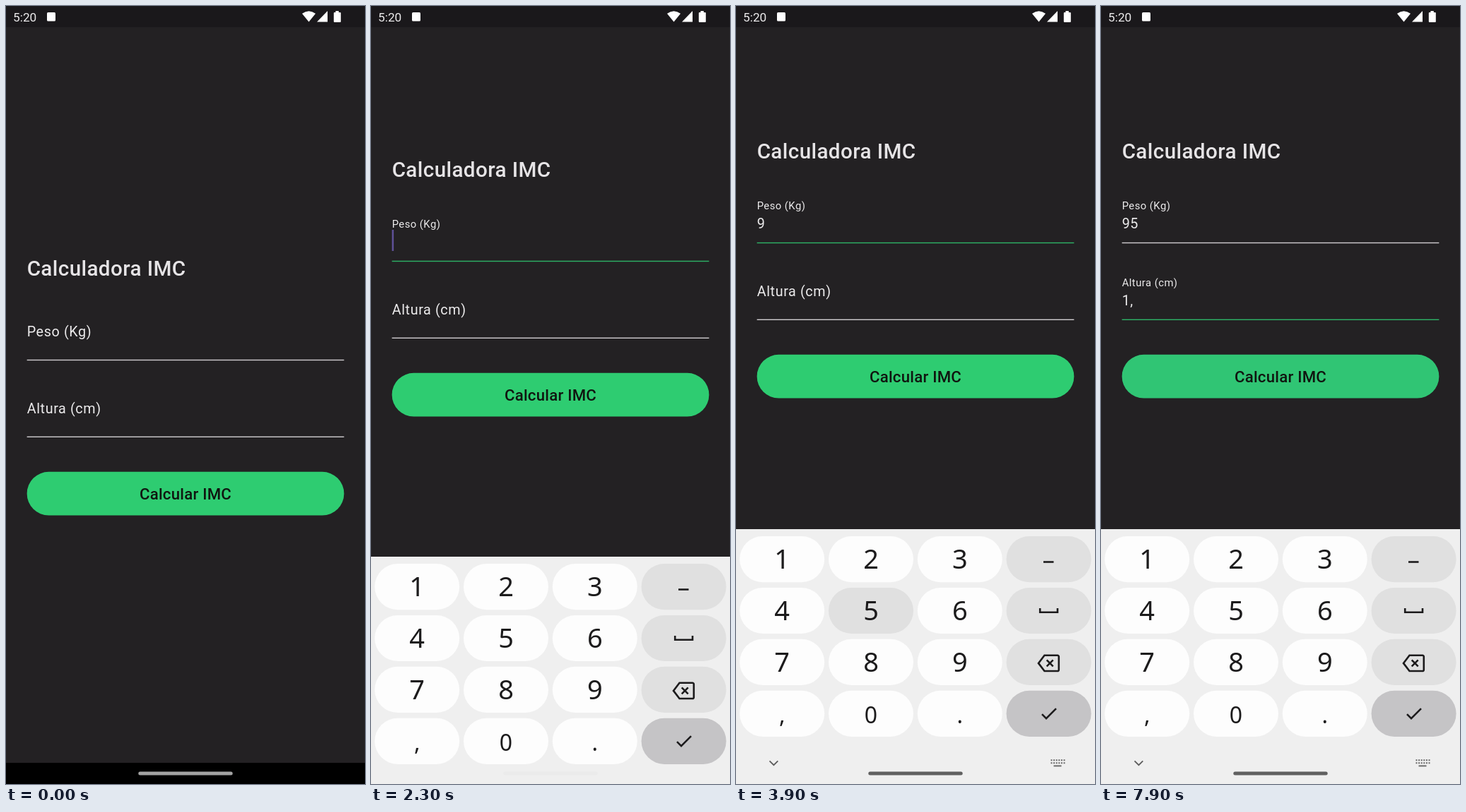
An HTML page that plays this animation: 508 px wide and 1102 px high, repeating every 8000 ms.

```html
<!DOCTYPE html>
<html lang="es">
<head>
<meta charset="utf-8">
<title>Calculadora IMC</title>
<style>
html, body { margin: 0; width: 100%; height: 100%; overflow: hidden; background: #232123; }
svg { display: block; width: 508px; height: 1102px; font-family: Roboto, sans-serif; fill: #ecebec; }
.anim { animation: 8s step-end -10ms infinite; }

.time { font-size: 17.28px; }
.title { font-size: 29.65px; font-weight: 500; letter-spacing: .37px; fill: #e6e4e6; }
.field { font-size: 19.76px; letter-spacing: .617px; }
.cta { font-size: 22.23px; font-weight: 500; letter-spacing: .22px; fill: #101510; text-anchor: middle; }
.digit { font: 38px "Noto Sans", sans-serif; text-anchor: middle; fill: #1c1b1c; }
.small { font-size: 32px; }
.icon { fill: none; stroke: #1c1b1c; stroke-width: 2.6; }

#form { animation-name: form; }
#board { animation-name: board; }
#caret { animation-name: caret; fill: #5f5098; }
#pill { animation-name: pill; animation-timing-function: linear; }
#button { animation-name: button; }
#label1 { animation-name: label1; }
#label2 { animation-name: label2; }
#line1 { animation-name: line1; }
#line2 { animation-name: line2; }
#w1 { animation-name: w1; }
#w2 { animation-name: w2; }
#h1 { animation-name: h1; }
#h2 { animation-name: h2; }

/* 100 ms = 1.25% */
@keyframes form {
  0% { transform: none; }
  28.75% { transform: translateY(-140px); }
  30% { transform: translateY(-163px); }
  31.25%, 100% { transform: translateY(-166px); }
}
@keyframes board {
  0% { transform: translateY(370px); }
  27.5% { transform: translateY(346px); }
  28.75% { transform: translateY(39px); }
  30% { transform: translateY(5px); }
  31.25%, 100% { transform: none; }
}
@keyframes caret {
  0% { opacity: 0; transform: none; }
  27.5% { opacity: 1; }
  33.75% { opacity: 0; }
  40% { opacity: 1; transform: none; }
  42.5% { opacity: 1; transform: translateX(11.7px); }
  48.75% { opacity: 0; }
  50% { opacity: 1; transform: translateX(23.4px); }
  56.25% { opacity: 0; }
  62.5% { opacity: 1; transform: translateX(23.4px); }
  66.25% { opacity: 1; transform: translateY(109px); }
  72.5% { opacity: 0; }
  78.75% { opacity: 1; transform: translateY(109px); }
  81.25% { opacity: 1; transform: translate(11.7px, 109px); }
  87.5% { opacity: 0; }
  92.5% { opacity: 1; transform: translate(16.3px, 109px); }
  98.75%, 100% { opacity: 0; transform: translate(16.3px, 109px); }
}
@keyframes pill {
  0% { fill: #a2a2a2; }
  10%, 27.5% { fill: #fff; }
  28.7%, 31.25% { fill: #ebebeb; }
  40% { fill: #929292; }
  48.75%, 100% { fill: #606060; }
}
@keyframes button { 0% { fill: #2ecc71; } 87.5%, 100% { fill: #30c574; } }
@keyframes label1 {
  0% { transform: none; }
  27.5% { transform: translateY(-11.3px) scale(.805); }
  28.75%, 100% { transform: translateY(-14.5px) scale(.75); }
}
@keyframes label2 {
  0% { transform: none; }
  66.25% { transform: translateY(-11.3px) scale(.805); }
  67.5%, 100% { transform: translateY(-14.5px) scale(.75); }
}
@keyframes line1 {
  0% { fill: #cfcdcf; }
  27.5% { fill: #52b67f; }
  28.75% { fill: #2db467; }
  66.25% { fill: #8fc2a5; }
  67.5%, 100% { fill: #cfcdcf; }
}
@keyframes line2 {
  0% { fill: #cfcdcf; }
  66.25% { fill: #52b67f; }
  67.5%, 100% { fill: #2db467; }
}
@keyframes w1 { 0% { opacity: 0; } 42.5%, 100% { opacity: 1; } }
@keyframes w2 { 0% { opacity: 0; } 50%, 100% { opacity: 1; } }
@keyframes h1 { 0% { opacity: 0; } 81.25%, 100% { opacity: 1; } }
@keyframes h2 { 0% { opacity: 0; } 92.5%, 100% { opacity: 1; } }
@keyframes press9 { 0%, 43.75%, 100% { fill: #fdfdfd; } 41.25% { fill: #e0e0e0; } }
@keyframes press5 { 0%, 51.25%, 100% { fill: #fdfdfd; } 48.75% { fill: #e0e0e0; } }
@keyframes press1 { 0%, 82.5%, 100% { fill: #fdfdfd; } 80% { fill: #e0e0e0; } }
@keyframes pressComma { 0%, 93.75%, 100% { fill: #fdfdfd; } 91.25% { fill: #e0e0e0; } }
</style>
</head>
<body>
<svg viewBox="0 0 508 1102">
  <rect width="508" height="1102" fill="#232123"/>

  <g id="form" class="anim">
    <text class="title" x="29.65" y="382.3">Calculadora IMC</text>

    <g class="field" transform="translate(29.65 468.3)">
      <text id="label1" class="anim">Peso (Kg)</text>
      <text y="13"><tspan id="w1t"></tspan></text>
      <text id="w1" class="anim" y="13">9</text>
      <text id="w2" class="anim" x="11.71" y="13">5</text>
    </g>
    <rect id="line1" class="anim" x="29.65" y="500.8" width="448.7" height="1.4"/>

    <g class="field" transform="translate(29.65 577.3)">
      <text id="label2" class="anim">Altura (cm)</text>
      <text id="h1" class="anim" y="13">1</text>
      <text id="h2" class="anim" x="11.71" y="13">,</text>
    </g>
    <rect id="line2" class="anim" x="29.65" y="609.6" width="448.7" height="1.4"/>

    <rect id="caret" class="anim" x="29.65" y="457" width="2.5" height="30"/>
    <rect id="button" class="anim" x="29.65" y="659.8" width="448.7" height="61.7" rx="30.85"/>
    <text class="cta" x="254" y="698.5">Calcular IMC</text>
  </g>

  <rect width="508" height="30" fill="#1a181b"/>
  <text class="time" x="10" y="21.8">5:20</text>
  <g fill="#fff">
    <rect x="58" y="9" width="12" height="12.5" rx="1.5"/>
    <path d="M428.5 22.5 419 10.8Q428.5 3.5 438 10.8Z"/>
    <path d="M440 22.5 455 7V22.5Z"/>
    <path d="M466.4 7h4.4v2h2a1 1 0 0 1 1 1v12a1 1 0 0 1-1 1h-8a1 1 0 0 1-1-1v-12a1 1 0 0 1 1-1h1.6z"/>
  </g>

  <rect y="1072" width="508" height="30" fill="#000"/>

  <g id="board" class="anim">
    <rect y="741" width="508" height="361" fill="#efefef"/>
    <g id="keys"></g>
    <g class="icon">
      <path d="M435 787.5h14.5"/>
      <path d="M430.2 853v5.7h24.8V853"/>
      <path d="M436.5 919.8H455a1.8 1.8 0 0 1 1.8 1.8v18.6a1.8 1.8 0 0 1-1.8 1.8H436.5L428 930.9Z"/>
      <path d="M439.7 926.4l9 9m0-9l-9 9"/>
      <path d="M433 1003.2l6 6 14-14"/>
      <path d="M47.5 1069.3l5.9 5.9 5.9-5.9" stroke="#555" style="stroke:#5c5c5c;stroke-width:1.8"/>
      <path d="M445.5 1068.2h20m-20 4h20" style="stroke:#666;stroke-width:1.9;stroke-dasharray:2 1.6"/>
      <path d="M449.5 1076.4h11" style="stroke:#666;stroke-width:1.9"/>
    </g>
  </g>
  <rect id="pill" class="anim" x="187.3" y="1084.4" width="133.4" height="5" rx="2.5"/>
</svg>
<script>
const rows = ["123_", "456 ", "789<", ",0.>"];
const presses = { 9: "press9", 5: "press5", 1: "press1", ",": "pressComma" };

function key(char, col, row) {
  const x = 5.2 + col * 125.8, y = 751 + row * 72.9;
  const fill = col < 3 ? "#fdfdfd" : row < 3 ? "#e0e0e0" : "#c5c4c6";
  const press = presses[char] ? `class="anim" style="animation-name:${presses[char]}"` : "";
  const cap = `<rect x="${x}" y="${y}" width="120" height="65.2" rx="32.6" fill="${fill}" ${press}/>`;
  if (col > 2) return cap;
  const small = row > 2 ? " small" : "";
  return cap + `<text class="digit${small}" x="${x + 60}" y="${y + 46.3}">${char}</text>`;
}

document.getElementById("keys").innerHTML =
  rows.map((line, row) => [...line].map((char, col) => key(char, col, row)).join("")).join("");
document.getElementById("w1t").parentNode.remove();
</script>
</body>
</html>
```
